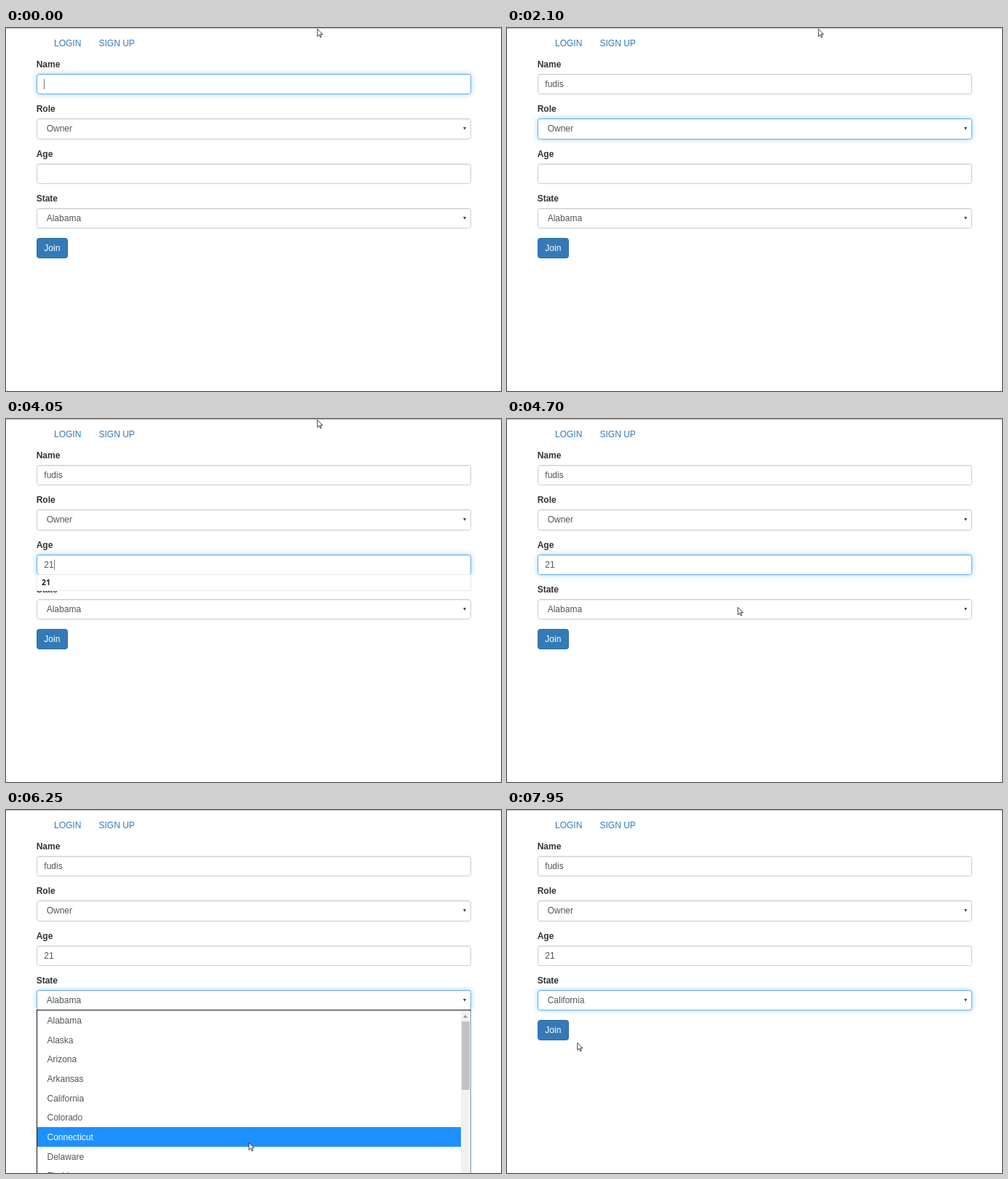
Animation of 680 by 498 pixels, one loop 8000 ms. Source, as an HTML page:

```html
<!DOCTYPE html>
<html lang="en">
<head>
<meta charset="utf-8">
<title>Sign-up form</title>
<style>
html, body { margin: 0; width: 100%; height: 100%; overflow: hidden; background: #fff; }
#stage { position: relative; width: 680px; height: 498px; overflow: hidden; background: #fff;
  font: 12px/14px "Liberation Sans", Arial, sans-serif; color: #555; }
#stage div { position: absolute; box-sizing: border-box; white-space: pre; }
#stage .topline { left: 0; top: 0; width: 680px; height: 1px; background: #bdbdbd; }
#stage .link { color: #337ab7; }
#stage .label { color: #333; font-weight: bold; }
#stage .field { left: 42px; width: 597px; height: 28.4px; border: 1px solid #ccc; border-radius: 3.5px; background: #fff; }
#stage .tri { width: 0; height: 0; border: solid transparent; border-width: 4.5px 2.7px 0; border-top-color: #444; }
#stage .join { left: 42px; top: 288px; width: 42.5px; height: 28px; border: 1px solid #2e6da4; border-radius: 3.5px; background: #337ab7; }
#stage .white { color: #fff; }
#stage .hint { left: 41.5px; width: 597.5px; height: 22.5px; border: 1px solid #e9e9e9; background: #fff;
  padding-left: 6.5px; font: bold 10.5px/20px "Open Sans", "Noto Sans", sans-serif; color: #222; }
#stage .list { left: 42px; top: 274px; width: 597px; height: 240px; background: #fff;
  border: 1px solid #15151f; border-right-color: #7f93b8; }
#stage .bar { left: 42px; width: 582px; height: 26.65px; background: #1e90ff; }
#stage .track { left: 624.5px; top: 275px; width: 13px; height: 230px; background: #f1f1f1; }
#stage .thumb { left: 625.5px; top: 290px; width: 11.5px; height: 94px; background: #c1c1c1; }
#stage .up { left: 628px; top: 281px; width: 0; height: 0; border: solid transparent; border-width: 0 3.2px 4px; border-bottom-color: #999; }
.caret { display: inline-block; width: 0; height: 14px; border-left: 1px solid #777; margin: 0 -1px 0 0; vertical-align: top; }
#cursor { position: absolute; left: 0; top: 0; overflow: visible; }
</style>
</head>
<body>
<div id="stage"></div>
<script>
const LOOP = 8000, STEP = 50, ROW = 26.65, LIST_TOP = 275;
const USER = "fudis", AGE = "21";
const STATES = ["Alabama", "Alaska", "Arizona", "Arkansas", "California",
  "Colorado", "Connecticut", "Delaware", "Florida"];
const stage = document.getElementById("stage");

function box(cls, style = {}, text = "", parent = stage) {
  const el = document.createElement("div");
  el.className = cls;
  Object.assign(el.style, style);
  el.textContent = text;
  parent.append(el);
  return el;
}
// Places text by its left edge and baseline.
const label = (text, x, base, cls = "", parent = stage) =>
  box(cls, { left: x + "px", top: base - 11 + "px" }, text, parent);
const show = (el, on) => { el.style.visibility = on ? "visible" : "hidden"; };

box("topline");
label("LOGIN", 66, 25, "link");
label("SIGN UP", 127.5, 25, "link");

// focus: [start, end] of keyboard focus
const fields = [
  { name: "Name", top: 63, base: 81, focus: [-1000, 1950] },
  { name: "Role", top: 124.3, base: 142, focus: [1950, 2600], value: "Owner" },
  { name: "Age", top: 185.6, base: 204, focus: [2600, 5150] },
  { name: "State", top: 247, base: 265, focus: [5150, 9999], value: "Alabama" }
];
for (const f of fields) {
  label(f.name, 41.7, f.base - 27, "label");
  f.box = box("field", { top: f.top + "px" });
  f.text = label(f.value || "", f.value ? 55.7 : 52.3, f.base);
  if (f.value) box("tri", { left: "627.5px", top: f.top + 12 + "px" });
  else {
    f.chars = document.createElement("span");
    f.caret = document.createElement("span");
    f.caret.className = "caret";
    f.text.append(f.chars, f.caret);
  }
}
const [nameField, , ageField, stateField] = fields;

box("join");
label("Join", 52.3, 306, "white");

const nameHint = box("hint", { top: "91px" }, USER);
const ageHint = box("hint", { top: "213px" }, AGE);

const menu = box("", { left: 0, top: 0, width: "680px", height: "498px" });
box("list", {}, "", menu);
const bar = box("bar", { left: "43px", width: "581.5px" }, "", menu);
const rows = STATES.map((s, i) => label(s, 56.5, Math.round(293 + i * ROW), "", menu));
["track", "thumb", "up"].forEach(c => box(c, {}, "", menu));

stage.insertAdjacentHTML("beforeend",
  `<svg id="cursor" width="12" height="19"><path transform="scale(.62)"
   d="M0.5 0.5V17L4.3 13.3L6.8 19L9.3 18L6.8 12.3H12Z" fill="#fff" stroke="#222" stroke-width="1.4"/></svg>`);
const cursor = document.getElementById("cursor");

// time, x, y of the pointer tip
const path = [
  [0, 427.5, 1], [4250, 427.5, 1], [4450, 380, 130], [4650, 322, 255], [4800, 306.5, 264],
  [5650, 306.5, 264], [5850, 313, 325], [6050, 325, 415], [6200, 332, 455], [6250, 333.5, 456],
  [6320, 338, 455], [6450, 349, 428], [6600, 357, 414], [6750, 361.5, 407], [7000, 361.5, 400],
  [7400, 361.5, 400], [7600, 270, 365], [7800, 140, 328], [7950, 96.5, 319], [8000, 96.5, 319]
];
function pointer(t) {
  const i = Math.max(1, path.findIndex(p => p[0] >= t));
  const [a, b] = [path[i - 1], path[i]];
  const k = (t - a[0]) / (b[0] - a[0]);
  return [a[1] + (b[1] - a[1]) * k, a[2] + (b[2] - a[2]) * k];
}

const within = (t, a, b) => t >= a && t < b;
// Latest value of a [time, value] table.
const at = (t, table) => table.reduce((v, [time, next]) => t >= time ? next : v, table[0][1]);
const ease = (t, start) => {
  const k = Math.min(1, Math.max(0, (t - start) / 170));
  return k * k * (3 - 2 * k);
};
const mix = (a, b, k) => a + (b - a) * k;

function draw(t) {
  for (const { box: el, focus: [from, to] } of fields) {
    const k = ease(t, from) - ease(t, to);
    el.style.borderColor = `rgb(${mix(204, 102, k)},${mix(204, 175, k)},${mix(204, 233, k)})`;
    el.style.boxShadow = `inset 0 1px 1px rgba(0,0,0,.075), 0 0 7px rgba(102,175,233,${0.6 * k})`;
  }

  nameField.chars.textContent = USER.slice(0, at(t, [[0, 0], [150, 1], [300, 2], [450, 3], [1750, 5]]));
  show(nameField.caret, t < 1050 || within(t, 1550, 1950));
  show(nameHint, within(t, 200, 1750));
  nameHint.style.background = t >= 1600 ? "#e4e4e4" : "#fff";

  ageField.chars.textContent = AGE.slice(0, at(t, [[0, 0], [3700, 1], [3900, 2]]));
  show(ageField.caret, within(t, 2650, 3050) || within(t, 3650, 4550));
  show(ageHint, within(t, 3750, 4350));

  const [x, y] = pointer(t);
  const hover = Math.max(0, Math.floor((y - LIST_TOP) / ROW));
  menu.style.display = within(t, 5250, 7350) ? "block" : "none";
  bar.style.top = LIST_TOP + hover * ROW + "px";
  rows.forEach((r, i) => { r.className = i === hover ? "white" : ""; });
  stateField.text.textContent = t < 7350 ? "Alabama" : "California";

  cursor.style.transform = `translate(${x}px,${y}px)`;
}

const start = performance.now();
function tick() {
  const t = (performance.now() - start) % LOOP;
  draw(Math.floor(t / STEP) * STEP);
  requestAnimationFrame(tick);
}
tick();
</script>
</body>
</html>
```
